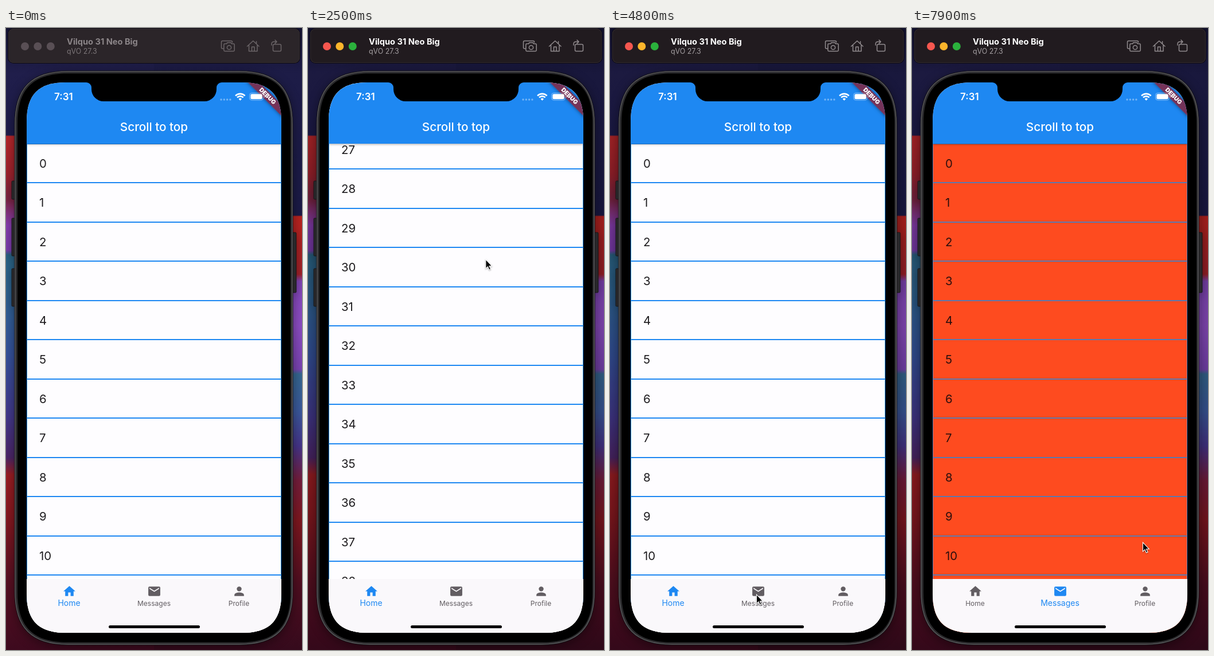
An HTML page that plays this animation: 516x1086 px, repeating every 8000 ms.

```html
<!DOCTYPE html>
<html lang="en">
<head>
<meta charset="utf-8">
<title>Scroll to top</title>
<style>
  :root { --blue: #1e88f2; --grey: #625d62; }
  html, body { margin: 0; width: 100%; height: 100%; overflow: hidden; background: #17163c; }
  #stage { position: absolute; left: 0; top: 0; width: 516px; height: 1086px; overflow: hidden; font-family: Inter, sans-serif; }
  #stage > *, #screen > * { position: absolute; }
  svg { display: block; }
  svg text { font-family: Inter, sans-serif; }

  .wall { top: 0; width: 258px; height: 1086px; filter: brightness(.86); }
  .wall.l {
    left: 0;
    background: linear-gradient(#131230 0, #201e4b 80px, #1d1b49 187px, #b5262a 189px, #9c222c 255px,
      #7c2545 300px, #8a3fb4 345px, #7d3db0 388px, #2a6384 396px, #2f6593 460px, #34519a 570px,
      #42378a 680px, #4b2566 750px, #991d22 780px, #86181f 850px, #581022 960px, #3d0a1e 1086px);
  }
  .wall.r {
    right: 0;
    background: linear-gradient(#131230 0, #1d1c47 80px, #1b1a46 327px, #b8231f 329px, #a5222a 430px,
      #8447bb 442px, #8a4cc0 520px, #7843b0 596px, #35668f 604px, #3a579a 670px, #453488 730px,
      #741d3b 790px, #7d171f 860px, #4f0e20 970px, #350a1c 1086px);
  }
  .idle .wall { filter: none; }

  #bar { left: 4px; top: 1px; width: 508px; height: 60px; border-radius: 9px; background: #211b1f; box-shadow: 0 0 0 1px #0c0a12, inset 0 0 0 1px #322b30; }
  .idle #bar { background: #2b2529; }
  #chrome { left: 0; top: 0; }
  #chrome .name { fill: #fff; font-weight: 700; font-size: 14.6px; }
  #chrome .ver { fill: #a39ea1; font-size: 12.4px; }
  #chrome .icons { fill: none; stroke: #918b8e; stroke-width: 1.5; stroke-linejoin: round; stroke-linecap: round; }
  .idle #chrome .name { fill: #8b8588; }
  .idle #chrome .ver { fill: #7c7679; }
  .idle #chrome .icons { stroke: #6b6568; }
  .idle #chrome .lights circle { fill: #594f55; }

  #phone { left: 0; top: 0; filter: drop-shadow(0 4px 9px rgba(0, 0, 0, .4)); }
  #screen { left: 36px; top: 95px; width: 444px; height: 961px; overflow: hidden; background: #fefdff; }
  .list { left: 0; top: 106.7px; width: 444px; display: none; }
  .list.on { display: block; }
  .row {
    box-sizing: border-box; height: 68.53px; padding-left: 21px; border: 1px solid var(--line);
    background: var(--fill); color: var(--ink); font-size: 20.4px; line-height: 67.5px;
  }
  #home { --fill: #fefdff; --line: #1e88f2; --ink: #1d1b1e; }
  #mail { --fill: #fe4b1f; --line: #5b78ae; --ink: #2b0f0d; }
  #head {
    left: 0; top: 0; width: 444px; height: 107px; background: var(--blue); color: #fff; box-shadow: 0 1px 4px rgba(0, 0, 0, .35);
    font-weight: 500; font-size: 20.7px; line-height: 156px; text-align: center;
  }
  #debug {
    right: -58px; top: 17.2px; width: 165px; height: 14.4px; transform: rotate(45deg);
    background: rgba(139, 30, 52, .8); box-shadow: 0 0 6px rgba(0, 0, 0, .5);
    color: #fff; font-weight: 900; font-size: 10.4px; line-height: 14.6px; text-align: center;
  }
  #tabs { left: 0; top: 867px; width: 444px; height: 94px; background: #faf8fb; display: flex; }
  .tab { flex: 1; position: relative; color: var(--grey); fill: currentColor; }
  .tab svg { position: absolute; left: 61.5px; top: 8.6px; }
  .tab span { position: absolute; left: 0; width: 100%; top: 34px; line-height: 18px; font-size: 12px; text-align: center; }
  .tab.on { color: var(--blue); }
  .tab.on span { font-size: 14px; top: 33px; }
  #pill { left: 143px; top: 947.5px; width: 159px; height: 5px; border-radius: 3px; background: #000; }
  #over, #cursor { left: 0; top: 0; }
  #cursor { overflow: visible; filter: drop-shadow(0 1px 1px rgba(0, 0, 0, .35)); }
</style>
</head>
<body>
<div id="stage" class="idle">
  <div class="wall l"></div>
  <div class="wall r"></div>
  <div id="bar"></div>

  <svg id="chrome" width="516" height="62">
    <g class="lights">
      <circle cx="33" cy="32" r="7" fill="#f6574f"/>
      <circle cx="55.3" cy="32" r="7" fill="#fbb52b"/>
      <circle cx="77.8" cy="32" r="7" fill="#2bb13c"/>
    </g>
    <text class="name" x="106" y="29">Vilquo 31 Neo Big</text>
    <text class="ver" x="106" y="45">qVO 27.3</text>
    <g class="icons">
      <path d="M379 36h-1.5q-2 0-2-2v-9.500q0-2 2-2h15q2 0 2 2v.5"/>
      <path d="M381.500 27.500h3l1.500-2h6l1.500 2h3q1.700 0 1.700 1.700v9.600q0 1.700-1.700 1.700h-15q-1.700 0-1.700-1.700v-9.600q0-1.700 1.700-1.700z"/>
      <circle cx="389" cy="34" r="3.600"/>
      <path d="M420.500 32l10.300-9.500 10.200 9.500M423.500 30v10.500h14.500V30M428.500 40.500V33h4.500v7.500M436.500 27v-3.500"/>
      <path d="M467.500 28.500h10q2 0 2 2v8q0 2-2 2h-10q-2 0-2-2v-8q0-2 2-2zM463 30v-2q0-4 4-4h4.500M469 21l3 3-3 3"/>
    </g>
  </svg>

  <svg id="phone" width="516" height="1086">
    <g fill="#29282b" stroke="#111" stroke-width=".8">
      <rect x="10" y="267" width="8" height="32" rx="1.500"/>
      <rect x="10" y="332" width="8" height="66" rx="1.500"/>
      <rect x="10" y="420" width="8" height="66" rx="1.500"/>
      <rect x="498" y="357" width="8" height="105" rx="1.500"/>
    </g>
    <path id="rim" fill="#0e0e10"/>
    <path id="frame" fill="#2a2a2c" stroke="#59585b" stroke-width="1.500"/>
    <path id="bezel"/>
  </svg>

  <div id="screen">
    <div class="list" id="home"></div>
    <div class="list" id="mail"></div>
    <div id="head">Scroll to top</div>
    <div id="debug">DEBUG</div>
    <div id="tabs">
      <div class="tab"><svg width="25" height="25" viewBox="0 0 24 24"><path d="M10 20v-6h4v6h5v-8h3L12 3 2 12h3v8z"/></svg><span>Home</span></div>
      <div class="tab"><svg width="25" height="25" viewBox="0 0 24 24"><path d="M20 4H4q-2 0-2 2v12q0 2 2 2h16q2 0 2-2V6q0-2-2-2zm0 4l-8 5-8-5V6l8 5 8-5z"/></svg><span>Messages</span></div>
      <div class="tab"><svg width="25" height="25" viewBox="0 0 24 24"><circle cx="12" cy="8" r="4"/><path d="M12 14c-2.700 0-8 1.300-8 4v2h16v-2c0-2.700-5.300-4-8-4z"/></svg><span>Profile</span></div>
    </div>
    <div id="pill"></div>
  </div>

  <svg id="over" width="516" height="200">
    <path d="M140 94v1a9 9 0 0 1 9 9v3a21 21 0 0 0 21 21h176a21 21 0 0 0 21-21v-3a9 9 0 0 1 9-9v-1z"/>
    <text x="84" y="126" fill="#fff" font-size="17" font-weight="600">7:31</text>
    <g fill="#fff" fill-opacity=".38">
      <circle cx="375" cy="125" r="1.700"/><circle cx="380.300" cy="125" r="1.700"/>
      <circle cx="385.600" cy="125" r="1.700"/><circle cx="390.900" cy="125" r="1.700"/>
    </g>
    <g fill="none" stroke="#fff" stroke-width="2.600">
      <path d="M400 118.300a11.700 11.700 0 0 1 16.600 0M403 121.400a7.400 7.400 0 0 1 10.600 0"/>
    </g>
    <path d="M408.300 126.700l-2.700-2.800a3.800 3.800 0 0 1 5.400 0z" fill="#fff"/>
    <rect x="424.500" y="113.500" width="24" height="12.500" rx="4" fill="none" stroke="#fff" stroke-opacity=".45"/>
    <rect x="426.300" y="115.300" width="20.400" height="9" rx="2.500" fill="#fff"/>
    <path d="M450 117.500q2 .8 2 2.300t-2 2.300z" fill="#fff" fill-opacity=".5"/>
  </svg>

  <svg id="cursor" width="14" height="22">
    <path d="M.4 .2V16L4 12.700 6.400 18.300 9 17.200 6.600 11.700H11.300Z" stroke="#fff" stroke-width="1.100"/>
  </svg>
</div>

<script>
  const LOOP = 8000, STEP = 100, FOCUS = 300, SWITCH = 5000;
  const $ = id => document.getElementById(id);
  const linear = p => p, out = p => 1 - (1 - p) ** 2, smooth = p => p * p * (3 - 2 * p);

  // Rectangle with continuous corners that span r along each side
  function squircle(x, y, w, h, r) {
    const c = r * .31, X = x + w, Y = y + h;
    return `M${x} ${y + r}C${x} ${y + c} ${x + c} ${y} ${x + r} ${y}` +
      `H${X - r}C${X - c} ${y} ${X} ${y + c} ${X} ${y + r}` +
      `V${Y - r}C${X} ${Y - c} ${X - c} ${Y} ${X - r} ${Y}` +
      `H${x + r}C${x + c} ${Y} ${x} ${Y - c} ${x} ${Y - r}Z`;
  }
  $('rim').setAttribute('d', squircle(14.5, 74.5, 486, 1003, 94));
  $('frame').setAttribute('d', squircle(16, 76, 483, 1000, 92));
  $('bezel').setAttribute('d', squircle(20, 79.5, 476, 993, 87));
  $('screen').style.clipPath = `path("${squircle(0, 0, 444, 961, 68)}")`;

  // Keys: [time, values, easing from the previous key]
  const homeScroll = [
    [500, [0]], [700, [230], linear], [1200, [694], out],
    [1400, [905], linear], [2000, [1512], out],
    [2200, [1694], linear], [2900, [1962], out],
    [3300, [1962]], [3600, [0], linear]
  ];
  const mailScroll = [
    [5400, [0]], [5600, [235], linear], [6400, [757], out],
    [6700, [757]], [7000, [0], linear]
  ];
  const pointer = [
    [100, [300, 880]], [500, [232, 790]], [700, [228, 560], linear], [1200, [228, 741]],
    [1400, [236, 530], linear], [2000, [260, 721]],
    [2200, [268, 540], linear], [3000, [399, 110]], [3600, [399, 110]],
    [4700, [255, 989]], [5000, [255, 989]], [5400, [270, 780]],
    [5600, [274, 545], linear], [6400, [308, 135]], [7100, [308, 135]],
    [7900, [402, 898]]
  ];

  function at(keys, t) {
    const i = keys.findIndex(k => k[0] > t);
    if (i === 0) return keys[0][1];
    if (i < 0) return keys[keys.length - 1][1];
    const [t0, a] = keys[i - 1], [t1, b, ease = smooth] = keys[i];
    const p = ease((t - t0) / (t1 - t0));
    return a.map((v, n) => v + (b[n] - v) * p);
  }

  const lists = [$('home'), $('mail')];
  const tabs = document.querySelectorAll('.tab');
  for (const list of lists)
    list.innerHTML = Array.from({ length: 52 }, (_, n) => `<div class="row">${n}</div>`).join('');

  function draw() {
    const t = Math.floor(performance.now() % LOOP / STEP) * STEP;
    const active = t < SWITCH ? 0 : 1;
    const scroll = Math.round(at(active ? mailScroll : homeScroll, t)[0]);
    const [x, y] = at(pointer, t);

    $('stage').classList.toggle('idle', t < FOCUS);
    lists.forEach((l, i) => l.classList.toggle('on', i === active));
    tabs.forEach((l, i) => l.classList.toggle('on', i === active));
    lists[active].style.transform = `translateY(${-scroll}px)`;
    $('cursor').style.visibility = t < 100 ? 'hidden' : 'visible';
    $('cursor').style.transform = `translate(${x}px, ${y}px)`;
    requestAnimationFrame(draw);
  }
  draw();
</script>
</body>
</html>
```
